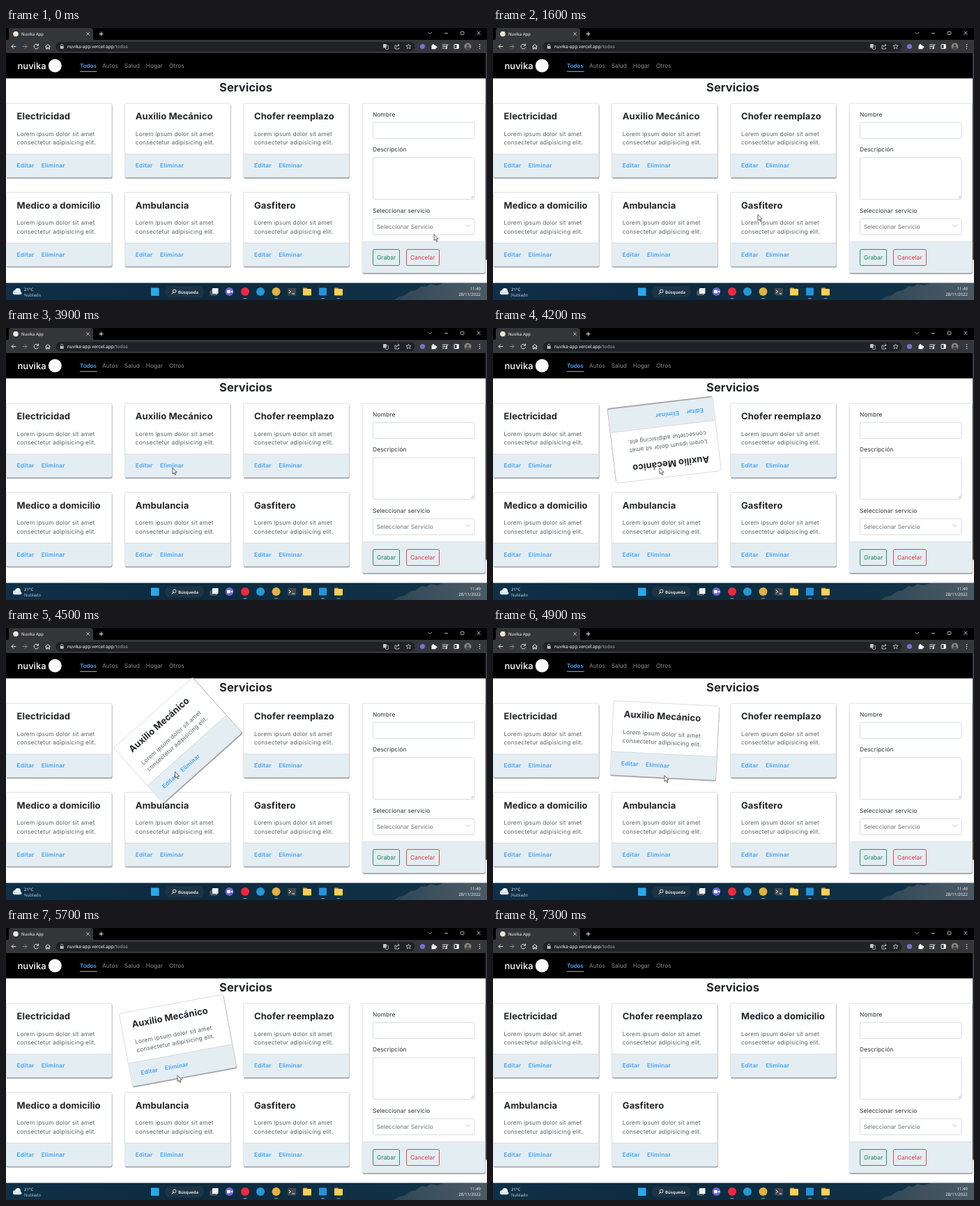
An HTML page for the animation above (8.2 s loop, 690 by 390 pixels).

```html
<!DOCTYPE html>
<html lang="es">
<head>
<meta charset="utf-8">
<title>Servicios</title>
<style>
  html, body { margin: 0; width: 100%; height: 100%; overflow: hidden; background: #fff; }
  svg { display: block; width: 690px; height: 390px; }
  text { font-family: Inter, "Open Sans", sans-serif; font-size: 8.4px; text-rendering: geometricPrecision; white-space: pre; }
  .ui { font-family: Roboto, "Open Sans", sans-serif; font-size: 6.9px; fill: #e8eaed; }
  .bar { font-family: "Open Sans", "Noto Sans", sans-serif; font-size: 6px; fill: #fff; }
  .title { font-size: 13px; font-weight: 650; fill: #212529; letter-spacing: .08px; }
  .body { fill: #5c6166; letter-spacing: .17px; }
  .link { fill: #3fa2f3; font-weight: 600; letter-spacing: .2px; }
  .label { fill: #2b2f33; letter-spacing: .12px; }
  .line { fill: none; stroke: #dfe1e5; stroke-width: 1; }
  .field { fill: #fff; stroke: #ced4da; stroke-width: .8; }
</style>
</head>
<body>
<svg id="stage" viewBox="0 0 690 390" xmlns="http://www.w3.org/2000/svg"></svg>
<script>
const LOOP = 8200, STEP = 100;
const SPIN_START = 3916, REMOVED = 5900, CURSOR_GONE = 7300;
const CARD_W = 152, CARD_H = 106.4, COL = 170.2, ROW = 127.5, TOP = 107.8;
const SPIN_CARD = 1;
const names = ["Electricidad", "Auxilio Mecánico", "Chofer reemplazo",
  "Medico a domicilio", "Ambulancia", "Gasfitero"];

const text = (x, y, s, cls = "", more = "") => `<text x="${x}" y="${y}" class="${cls}" ${more}>${s}</text>`;
const rect = (x, y, w, h, fill, r = 0, more = "") =>
  `<rect x="${x}" y="${y}" width="${w}" height="${h}" rx="${r}" fill="${fill}" ${more}/>`;
const disc = (x, y, r, fill, more = "") => `<circle cx="${x}" cy="${y}" r="${r}" fill="${fill}" ${more}/>`;
const line = (d, more = "") => `<path d="${d}" class="line" ${more}/>`;

// White panel with a tinted footer and a shadow that falls mostly downwards
function panel(w, h, foot) {
  return rect(.6, 1.9, w, h, "#a2a4a6", 2.4) +
    rect(.3, .3, w - .4, h - .4, "#fff", 2, 'stroke="#cfd1d3" stroke-width=".7"') +
    `<path d="M.6 ${foot}H${w - .4}V${h - 2.2}q0 1.8-1.8 1.8H2.4q-1.8 0-1.8-1.8Z" fill="#e4edf2"/>` +
    line(`M.5 ${foot}H${w - .4}`, 'style="stroke:#ccd3d7;stroke-width:.7"');
}

function card(name, i) {
  return `<g id="card${i}">${panel(CARD_W, CARD_H, 73)}` +
    text(15.6, 23.4, name, "title") +
    text(15.6, 47.2, "Lorem ipsum dolor sit amet", "body") +
    text(15.6, 59.4, "consectetur adipisicing elit.", "body") +
    text(15.6, 92.4, "Editar", "link") + text(50.8, 92.4, "Eliminar", "link") + "</g>";
}

function browser() {
  let s = rect(0, 0, 690, 18, "#000") +
    '<path d="M1 17.5q3 0 3-3V4q0-4 4-4H121q4 0 4 4V14.5q0 3 3 3Z" fill="#35363a"/>' +
    rect(0, 17, 690, 19, "#35363a") +
    disc(14, 8.5, 3.8, "#efe3d6") +
    text(22, 11, "Nuvika App", "ui", 'style="font-size:6.3px"') +
    line("M115.5 6.5l4 4m0-4l-4 4M133.5 8.5h6m-3-3v6") +
    line("M605.5 6l2.7 2.7L611 6", 'style="stroke:#8d9094"') +
    line("M629 7.5h5M675.5 4.7l5 5m0-5l-5 5", 'style="stroke-width:.8"') +
    rect(652.3, 5, 4.6, 4.6, "none", 1, 'stroke="#dfe1e5" stroke-width=".8"') +
    line("M14.5 26.5H8m3-3l-3 3 3 3") +
    line("M23.5 26.5H30m-3-3l3 3-3 3", 'style="stroke:#85888c"') +
    line("M46 24.5a3.3 3.3 0 1 0 .6 3M46.5 22.5v2.7H43.8") +
    line("M56.5 26.5l3.500-3 3.500 3M57.5 26v4h1.7v-2.2h1.6V30h1.7v-4");
  s += rect(71.5, 20, 515, 13.5, "#202124", 6.7) +
    rect(77.7, 26, 5, 3.8, "#bdc1c6", .5) + line("M78.7 26v-1.3a1.5 1.5 0 0 1 3 0V26", 'style="stroke:#bdc1c6;stroke-width:.8"') +
    text(88, 29, 'nuvika-app.vercel.app<tspan fill="#9aa0a6">/todos</tspan>', "ui");
  s += rect(541, 23, 4.7, 5.5, "#c4c7cb", .5) + rect(544.5, 25, 4, 5.5, "none", .5, 'stroke="#c4c7cb" stroke-width=".7"') +
    line("M560 25h-2v5h5.5v-2M560 27.5q0-3 4-3m-1.7-1.7l1.9 1.7-1.9 1.7", 'style="stroke-width:.8"') +
    line("M577.5 23l1 2.3 2.6.2-2 1.7.7 2.6-2.3-1.4-2.3 1.4.7-2.6-2-1.7 2.6-.2Z", 'style="stroke-width:.7"') +
    disc(597.5, 26.5, 3.6, "#7e6fd0") +
    rect(610.5, 24.8, 6, 5.5, "#fff", .6) + disc(613, 24.3, 1.3, "#fff") + disc(617, 27.3, 1.3, "#fff") +
    line("M626 24h6M626 26.5h6M626 29h3M632.5 29v-5h2") + disc(631.5, 29, 1.3, "#dfe1e5") +
    rect(643, 23.5, 6, 6, "none", .5, 'stroke="#fff"') + rect(646.5, 23.5, 3, 6, "#fff") +
    disc(662.5, 26.5, 5, "#8b8582") + disc(662.5, 25.3, 1.7, "#4b4644") +
    '<path d="M659 30a3.5 3 0 0 1 7 0a5 5 0 0 1-7 0" fill="#4b4644"/>' +
    [23.8, 26.5, 29.2].map(y => disc(679.5, y, .8, "#dfe1e5")).join("");
  return s;
}

function navbar() {
  const items = [[138, "Autos"], [169.7, "Salud"], [200.7, "Hogar"], [234, "Otros"]];
  return rect(0, 36, 688, 36.3, "#000") +
    text(16.5, 58.5, "nuvika", "", 'fill="#fff" style="font-size:13px;font-weight:500"') +
    disc(70.3, 54, 9.5, "#fff") +
    text(106, 57, "Todos", "", 'fill="#46a7f5" style="font-size:8px;font-weight:600"') +
    rect(106, 61.8, 24.5, 1.2, "#46a7f5") +
    items.map(([x, s]) => text(x, 57, s, "", 'fill="#8c8c8c"')).join("");
}

function form() {
  const button = (x, w, s, c) => rect(x, 317.5, w, 23, "none", 2, `stroke="${c}" stroke-width=".9"`) +
    text(x + 5.5, 332, s, "", `fill="${c}"`);
  const field = (y, h) => `<rect x="526.5" y="${y}" width="145.5" height="${h}" rx="2" class="field"/>`;
  return `<g transform="translate(510.700 ${TOP})">${panel(176.8, 243.3, 199)}</g>` +
    text(526, 126.5, "Nombre", "label") + field(135.3, 23) +
    text(526, 177.3, "Descripción", "label") + field(186, 59.5) +
    line("M667.5 244l3.500-3.500M669.7 244l1.300-1.300", 'style="stroke:#777;stroke-width:.6"') +
    text(526, 264.5, "Seleccionar servicio", "label") + field(273.5, 23) +
    text(531.7, 287.7, "Seleccionar Servicio", "", 'fill="#6c757d"') +
    line("M659.3 281.5l3.2 3.3 3.200-3.300", 'style="stroke:#a3cbe8"') +
    button(526.5, 38, "Grabar", "#198754") + button(574.5, 47, "Cancelar", "#dc3545");
}

function taskbar() {
  const folder = x => rect(x, 372.5, 6, 3, "#d99a1c", .6) + rect(x, 374, 12, 9.5, "#f9cf55", .8);
  const mark = x => rect(x - 2.5, 387.3, 5, 1, "#9aa5ad", .5);
  return rect(0, 365.5, 690, 24.5, "url(#bar)") +
    '<path d="M556 390l8-5 7-1 8-6 9-2 8-6 7 1 6-4 9 2 9-3H690V390Z" fill="url(#hill)"/>' +
    disc(13, 379, 3, "#dce7f0") + disc(17, 377, 4, "#eef4f9") + rect(10, 378, 12.5, 4.3, "#dce7f0", 2.1) +
    text(26, 376.5, "21°C", "bar") + text(26, 384.5, "Nublado", "bar", 'style="fill:#c8d0d6"') +
    rect(208, 372.5, 11.5, 11.5, "#2aa8ec") +
    rect(228, 370, 56, 16.5, "#1d3444", 8) +
    disc(241.7, 377.3, 2.3, "none", 'stroke="#fff" stroke-width=".9"') + line("M240 379l-2.3 2.5", 'style="stroke:#fff"') +
    text(247, 380.5, "Búsqueda", "bar", 'style="font-weight:600"') +
    rect(295, 375, 8, 8, "#7d868c") + rect(292.5, 376.5, 8.5, 7, "#555d63", .5) + rect(296, 373, 8.5, 8, "#eceff1", .5) +
    disc(320.5, 378, 6, "#6a63d2") + rect(317, 375.7, 5, 4.6, "#fff", 1) + '<path d="M322.5 378l2.500-1.700v3.400Z" fill="#fff"/>' +
    disc(343, 378, 6, "#f0283f") + disc(365, 378, 6, "#2598d5") + disc(387.5, 378, 6, "#e4b13d") +
    rect(404, 373, 12, 10.5, "#44484c", 1) + line("M406 376l2.5 2-2.5 2M410.5 381h3.5", 'style="stroke:#fff"') +
    folder(426) + rect(449, 372.5, 11, 11, "#2593dc", 1) + folder(471) +
    [343, 387.5, 454.5, 477].map(mark).join("") +
    text(681, 376.3, "11:49", "bar", 'text-anchor="end"') +
    text(681, 384.3, "28/11/2022", "bar", 'text-anchor="end"');
}

const stage = document.getElementById("stage");
stage.innerHTML = `<defs>
    <linearGradient id="bar">
      <stop offset="0" stop-color="#0f3048"/><stop offset=".4" stop-color="#0d2a3e"/>
      <stop offset="1" stop-color="#123449"/>
    </linearGradient>
    <linearGradient id="hill">
      <stop offset="0" stop-color="#2c4656"/><stop offset=".5" stop-color="#40525f"/>
      <stop offset="1" stop-color="#4a5a65"/>
    </linearGradient>
  </defs>` +
  rect(0, 36, 690, 330, "#fff") + navbar() + browser() +
  rect(688, 36, 2, 329.5, "#f1f1f1") + rect(688, 36, 2, 296.5, "#3b3d40") +
  text(344, 90.5, "Servicios", "", 'text-anchor="middle" fill="#212529" style="font-size:16.6px;font-weight:650"') +
  form() + names.map((n, i) => i === SPIN_CARD ? "" : card(n, i)).join("") + card(names[SPIN_CARD], SPIN_CARD) +
  taskbar() +
  `<path id="cursor" d="M0 0V8.7l2-1.8 1.5 3.3 1.400-.6L3.5 6.3H6.2Z" fill="#fff" stroke="#222" stroke-width=".7"/>`;

const cards = names.map((_, i) => document.getElementById("card" + i));
const cursor = document.getElementById("cursor");

// Keys are [time, value...]; values are linear between keys
function track(keys, t) {
  const n = keys.findIndex(k => k[0] > t);
  if (n === 0) return keys[0].slice(1);
  if (n < 0) return keys[keys.length - 1].slice(1);
  const a = keys[n - 1], b = keys[n], p = (t - a[0]) / (b[0] - a[0]);
  return a.slice(1).map((v, i) => v + (b[i + 1] - v) * p);
}

// The CSS "ease" curve
function ease(x) {
  let lo = 0, hi = 1;
  for (let i = 0; i < 24; i++) {
    const s = (lo + hi) / 2;
    if (.75 * s * (1 - s) + s ** 3 < x) lo = s; else hi = s;
  }
  const s = lo, r = 1 - s;
  return .3 * r * r * s + 3 * r * s * s + s ** 3;
}

const turns = [[SPIN_START, 0], [4200, .284], [4900, 1.017], [5700, 1.783], [5917, 2]];
const path = [[0, 614, 296], [900, 612, 296], [1200, 376, 262], [1300, 376, 262], [1600, 380, 267.5],
  [1800, 378, 267.5], [2200, 256, 262], [2800, 90, 204.5], [3100, 90, 204.5], [3200, 92, 204],
  [3700, 239, 200.5], [4300, 239, 200.5], [4700, 246, 211.5], [6900, 246, 211.5], [7300, 662, 291]];

function draw(t) {
  const removed = t >= REMOVED;
  cards.forEach((c, i) => {
    const slot = removed && i > SPIN_CARD ? i - 1 : i;
    let move = `translate(${slot % 3 * COL} ${TOP + Math.floor(slot / 3) * ROW})`;
    if (i === SPIN_CARD) {
      const phase = track(turns, t)[0];
      move += ` rotate(${360 * ease(phase % 1)} ${CARD_W / 2} ${CARD_H / 2})`;
      c.setAttribute("visibility", removed ? "hidden" : "visible");
    }
    c.setAttribute("transform", move);
  });
  cursor.setAttribute("transform", `translate(${track(path, t).join(" ")})`);
  cursor.setAttribute("visibility", t >= CURSOR_GONE ? "hidden" : "visible");
}

const start = performance.now();
function tick() {
  const t = (performance.now() - start) % LOOP;
  draw(Math.floor(t / STEP) * STEP);
  requestAnimationFrame(tick);
}
tick();
</script>
</body>
</html>
```
